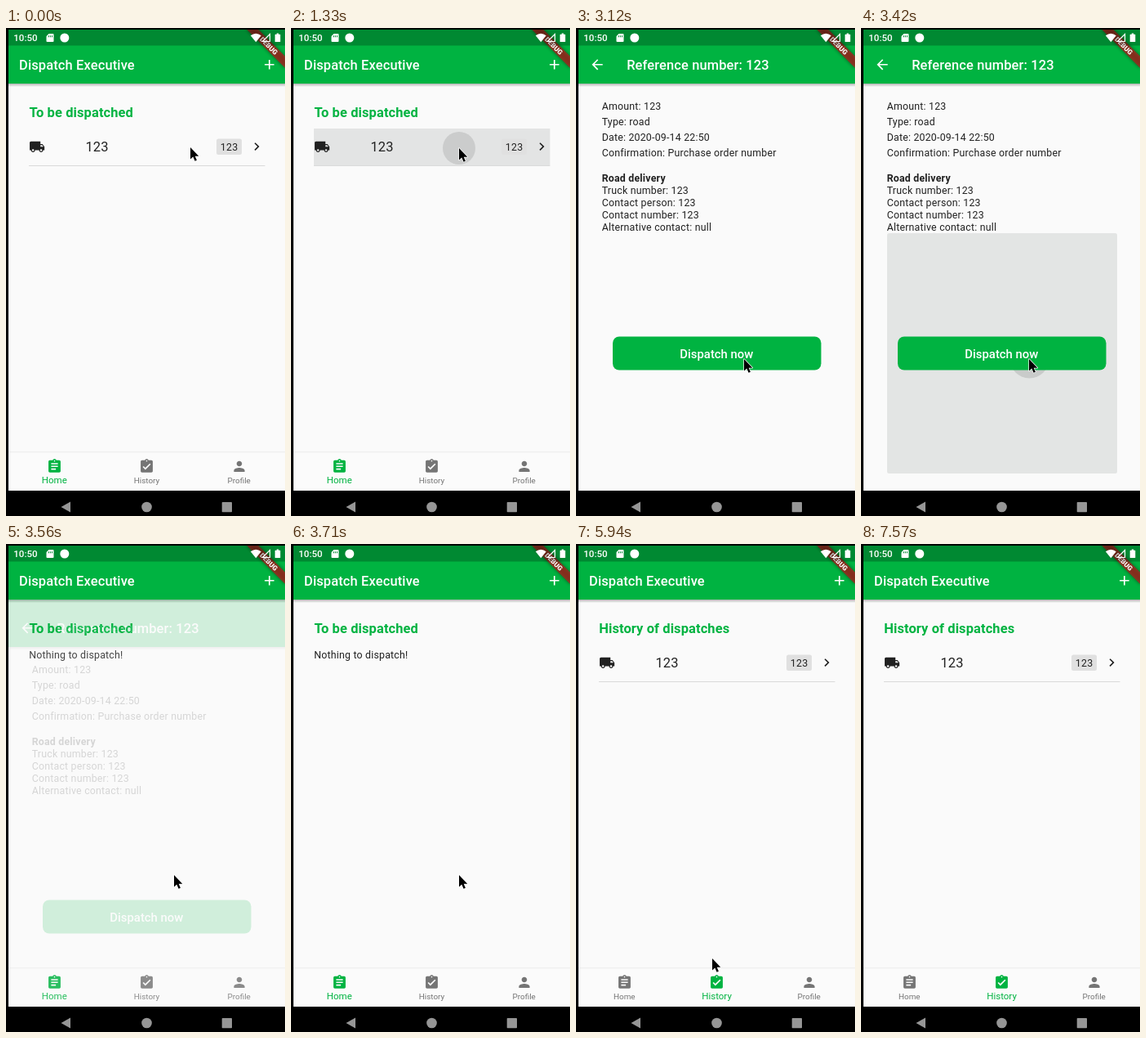
An HTML page for the animation above (7.9 s loop, 342 by 597 pixels).

```html
<!DOCTYPE html>
<html lang="en">
<head>
<meta charset="utf-8">
<title>Dispatch app</title>
<style>
html, body { margin: 0; width: 100%; height: 100%; overflow: hidden; background: #000; }
svg { display: block; width: 342px; height: 597px; }
text { font-family: Roboto, sans-serif; white-space: pre; }
.bar { font-size: 16.48px; font-weight: 500; letter-spacing: .12px; fill: #fff; }
.head { font-size: 16.48px; font-weight: 700; letter-spacing: .1px; fill: #00b341; }
.body { font-size: 12.36px; letter-spacing: .206px; fill: #212121; }
.bold { font-weight: 700; }
.mid { text-anchor: middle; }
.on { fill: #00b341; font-size: 11.54px; }
.off { fill: #757575; font-size: 9.89px; }

/* Every change is a hard cut on one shared 7.9 s clock. */
.list, .empty, .home, .history, .homeTab, .historyTab, .rowTap, .tabTap, .buttonTap, .detail, .cursor {
  animation: 7.9s step-end infinite;
}
.list { animation-name: list; }
.empty { animation-name: empty; }
.home { animation-name: home; }
.history { animation-name: history; }
.homeTab { animation-name: homeTab; }
.historyTab { animation-name: historyTab; }
.rowTap { animation-name: rowTap; }
.tabTap { animation-name: tabTap; }
.buttonTap { animation-name: buttonTap; }
.detail { animation-name: detail; }
.cursor { animation-name: cursor; }

@keyframes list { 0% { opacity: 1 } 43.291%, 100% { opacity: 0 } }
@keyframes empty { 0% { opacity: 0 } 43.291% { opacity: 1 } 65.696%, 100% { opacity: 0 } }
@keyframes home { 0% { opacity: 1 } 65.696%, 100% { opacity: 0 } }
@keyframes history { 0% { opacity: 0 } 65.696%, 100% { opacity: 1 } }
@keyframes homeTab { 0% { opacity: 1 } 65.696% { opacity: .5 } 67.594%, 100% { opacity: 0 } }
@keyframes historyTab { 0% { opacity: 0 } 65.696% { opacity: .5 } 67.594%, 100% { opacity: 1 } }
@keyframes rowTap { 0% { opacity: 0 } 16.835% { opacity: 1 } 18.734% { opacity: .6 } 20.632%, 100% { opacity: 0 } }
@keyframes tabTap { 0% { opacity: 0 } 63.797% { opacity: 1 } 65.696% { opacity: .5 } 67.594%, 100% { opacity: 0 } }
@keyframes buttonTap { 0% { opacity: 0 } 43.291% { opacity: 1 } 45.063%, 100% { opacity: 0 } }
@keyframes detail {
  0% { opacity: 0; transform: translateY(141px) }
  18.734% { opacity: .32; transform: translateY(31px) }
  20.632% { opacity: 1; transform: none }
  45.063% { opacity: .17; transform: translateY(58px) }
  46.962%, 100% { opacity: 0; transform: translateY(141px) }
}
@keyframes cursor {
  0% { transform: translate(226px, 146px) }
  5.569% { transform: translate(215px, 147px) }
  7.468% { transform: translate(206px, 147px) }
  26.329% { transform: translate(211px, 148px) }
  28.227% { transform: translate(225px, 166px) }
  30.126% { transform: translate(245px, 200px) }
  31.898% { transform: translate(254px, 252px) }
  33.797% { transform: translate(249px, 312px) }
  35.696% { transform: translate(234px, 362px) }
  37.594% { transform: translate(215px, 394px) }
  39.493% { transform: translate(206px, 405px) }
  54.430% { transform: translate(202px, 432px) }
  56.329% { transform: translate(189px, 488px) }
  58.227% { transform: translate(176px, 535px) }
  60.126% { transform: translate(172px, 551px) }
  75.189% { transform: translate(167px, 507px) }
  77.088% { transform: translate(187px, 424px) }
  78.860% { transform: translate(239px, 389px) }
  80.759% { transform: translate(255px, 406px) }
  82.658% { transform: translate(256px, 428px) }
  88.354% { transform: translate(265px, 455px) }
  90.253% { transform: translate(289px, 525px) }
  92.151% { transform: translate(304px, 580px) }
  95.822%, 100% { transform: translate(400px, 620px) }
}
</style>
</head>
<body>
<svg viewBox="0 0 342 597">
  <defs>
    <linearGradient id="shade" x2="0" y2="1">
      <stop stop-opacity=".28"/>
      <stop offset="1" stop-opacity="0"/>
    </linearGradient>
    <filter id="soft" x="-20%" y="-60%" width="140%" height="220%"><feGaussianBlur stdDeviation="2"/></filter>
    <clipPath id="screen"><path d="M3 2h339v564H3z"/></clipPath>
    <clipPath id="navArea"><path d="M3 519h339v47H3z"/></clipPath>

    <path id="board" d="M19 3h-4.18C14.4 1.84 13.3 1 12 1c-1.3 0-2.4.84-2.82 2H5c-1.1 0-2 .9-2 2v14c0 1.1.9 2 2 2h14c1.1 0 2-.9 2-2V5c0-1.1-.9-2-2-2zm-7 0c.55 0 1 .45 1 1s-.45 1-1 1-1-.45-1-1 .45-1 1-1zm2 14H7v-2h7v2zm3-4H7v-2h10v2zm0-4H7V7h10v2z"/>
    <path id="done" d="M19 3h-4.18C14.4 1.84 13.3 1 12 1c-1.3 0-2.4.84-2.82 2H5c-1.1 0-2 .9-2 2v14c0 1.1.9 2 2 2h14c1.1 0 2-.9 2-2V5c0-1.1-.9-2-2-2zm-7 0c.55 0 1 .45 1 1s-.45 1-1 1-1-.45-1-1 .45-1 1-1zm-2 14l-4-4 1.41-1.41L10 14.17l6.59-6.59L18 9l-8 8z"/>

    <g id="tabHome">
      <use href="#board" transform="translate(49.6 526.4) scale(.824)"/>
      <text class="mid" x="59.3" y="557">Home</text>
    </g>
    <g id="tabHistory">
      <use href="#done" transform="translate(162.6 526.4) scale(.824)"/>
      <text class="mid" x="172.5" y="557">History</text>
    </g>
    <g id="tabProfile">
      <path transform="translate(276.1 526.4) scale(.824)" d="M12 12c2.21 0 4-1.79 4-4s-1.79-4-4-4-4 1.79-4 4 1.79 4 4 4zm0 2c-2.67 0-8 1.34-8 4v2h16v-2c0-2.66-5.33-4-8-4z"/>
      <text class="mid" x="285.7" y="557">Profile</text>
    </g>

    <g id="row">
      <path fill="#212121" transform="translate(28.2 135.4) scale(.824)" d="M20 8h-3V4H3c-1.1 0-2 .9-2 2v11h2c0 1.66 1.34 3 3 3s3-1.34 3-3h6c0 1.66 1.34 3 3 3s3-1.34 3-3h2v-5l-3-4zM6 18.5c-.83 0-1.5-.67-1.5-1.5s.67-1.5 1.5-1.5 1.5.67 1.5 1.5-.67 1.5-1.5 1.5zm13.5-9l1.96 2.5H17V9.5h2.5zm-1.5 9c-.83 0-1.5-.67-1.5-1.5s.67-1.5 1.5-1.5 1.5.67 1.5 1.5-.67 1.5-1.5 1.5z"/>
      <text x="97.4" y="151.3" font-size="16.48" letter-spacing=".2" fill="#212121">123</text>
      <rect x="258" y="135.5" width="31" height="19.5" rx="2.5" fill="#e0e0e0"/>
      <text class="body mid" x="273.6" y="149.7">123</text>
      <path fill="#212121" transform="translate(297.4 135.2) scale(.824)" d="M10 6L8.59 7.41 13.17 12l-4.58 4.59L10 18l6-6z"/>
      <path fill="#dadada" d="M28 168h289.5v1H28z"/>
    </g>
    <g id="appBar">
      <path fill="url(#shade)" d="M3 68h339v4H3z"/>
      <path fill="#00b341" d="M3 2h339v66H3z"/>
    </g>
  </defs>

  <path d="M0 0h342v597H0z"/>

  <g clip-path="url(#screen)">
    <path fill="#fafafa" d="M3 2h339v564H3z"/>
    <use href="#appBar"/>
    <text class="bar" x="16" y="50.8">Dispatch Executive</text>
    <path fill="#fff" transform="translate(313 34.9) scale(.824)" d="M19 13h-6v6h-2v-6H5v-2h6V5h2v6h6v2z"/>

    <g class="home">
      <text class="head" x="28.4" y="109">To be dispatched</text>
      <g class="list">
        <g class="rowTap">
          <path fill="#e3e4e4" d="M28 123h289.5v45H28z"/>
          <circle cx="206" cy="147" r="20" fill="#cbcccc"/>
        </g>
        <use href="#row"/>
      </g>
      <text class="body empty" x="28.2" y="140.3">Nothing to dispatch!</text>
    </g>
    <g class="history">
      <text class="head" x="28.2" y="109">History of dispatches</text>
      <use href="#row"/>
    </g>

    <path fill="#efefef" d="M3 518h339v1.5H3z"/>
    <path fill="#fbfbfb" d="M3 519.5h339V566H3z"/>
    <g clip-path="url(#navArea)">
      <circle class="tabTap" cx="172.5" cy="543" r="28" fill="#dedfdf"/>
    </g>
    <use href="#tabHome" class="on homeTab"/>
    <use href="#tabHome" class="off historyTab"/>
    <use href="#tabHistory" class="off homeTab"/>
    <use href="#tabHistory" class="on historyTab"/>
    <use href="#tabProfile" class="off"/>

    <g class="detail">
      <path fill="#fafafa" d="M3 2h339v564H3z"/>
      <use href="#appBar"/>
      <path fill="#fff" transform="translate(16.2 34.9) scale(.824)" d="M20 11H7.83l5.59-5.59L12 4l-8 8 8 8 1.41-1.41L7.83 13H20v-2z"/>
      <text class="bar" x="62.2" y="50.8">Reference number: 123</text>
      <g class="body">
        <text x="31.7" y="100">Amount: 123</text>
        <text x="31.7" y="119">Type: road</text>
        <text x="31.7" y="138">Date: 2020-09-14 22:50</text>
        <text x="31.7" y="157">Confirmation: Purchase order number</text>
        <text x="31.7" y="188.3" class="bold">Road delivery</text>
        <text x="31.7" y="203">Truck number: 123</text>
        <text x="31.7" y="217.9">Contact person: 123</text>
        <text x="31.7" y="232.8">Contact number: 123</text>
        <text x="31.7" y="247.6">Alternative contact: null</text>
      </g>
      <g class="buttonTap">
        <rect x="32" y="251" width="282" height="294" rx="2.5" fill="#e3e5e4"/>
        <circle cx="206.5" cy="404.5" r="24" fill="#c9cbca"/>
      </g>
      <rect x="45" y="377.5" width="255.5" height="41" rx="8" fill="#00b341"/>
      <text class="mid" x="172.3" y="403.8" font-size="14.83" font-weight="500" fill="#fff">Dispatch now</text>
    </g>

    <g transform="translate(342 2) rotate(45)">
      <path filter="url(#soft)" opacity=".5" d="M-33 23h66v10h-66z"/>
      <path fill="#b71c1c" fill-opacity=".72" d="M-33 23h66v10h-66z"/>
      <text class="mid" y="31" font-size="8.4" font-weight="900" fill="#fff">DEBUG</text>
    </g>
    <path fill-opacity=".23" d="M3 2h339v19.5H3z"/>
  </g>

  <g fill="#fff">
    <text x="9.3" y="16" font-size="11.54" font-weight="500">10:50</text>
    <path fill-rule="evenodd" d="M52.5 7h5q1 0 1 1v8q0 1-1 1h-7q-1 0-1-1v-6zM52 9.2v2h1v-2zm2 0v2h1v-2zm2 0v2h1v-2z"/>
    <circle cx="71.8" cy="12" r="5.5"/>
    <path d="M299.8 9.2q6.5-5 13 0l-6.5 8z"/>
    <path d="M323.5 7.5v9h-9z" fill="none" stroke="#fff" stroke-width="1.2"/>
    <path d="M331.8 6.5h2.4v1.2h1.6q.5 0 .5.5v8.3q0 .5-.5.5h-5.6q-.5 0-.5-.5V8.200q0-.5.5-.5h1.600z"/>
  </g>
  <g fill="#969696">
    <path d="M67.500 586L79 579.500v13z"/>
    <circle cx="172.500" cy="586" r="6.300"/>
    <rect x="264.700" y="580" width="12.300" height="12.300" rx=".8"/>
  </g>

  <path class="cursor" d="M0 0v14.500l3.300-3 2.300 5.200 2.300-1-2.200-5h4.600z" stroke="#fff" stroke-width="1.400" stroke-linejoin="round" paint-order="stroke"/>
</svg>
</body>
</html>
```
